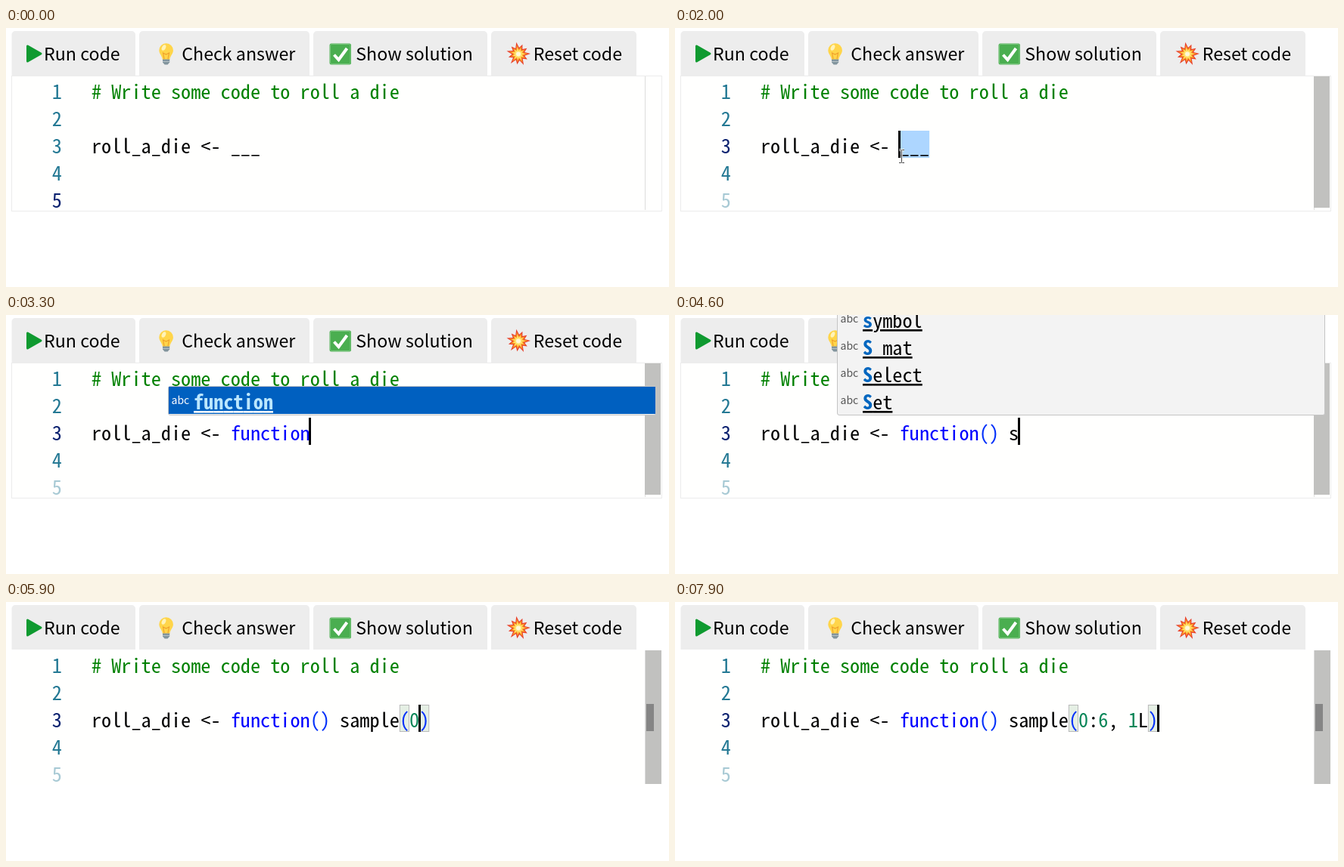
Write an HTML page that moves like this. It is 876 px wide and 343 px high and loops after 8000 ms.

```html
<!DOCTYPE html>
<html lang="en">
<head>
<meta charset="utf-8">
<title>Code editor</title>
<style>
  html, body { margin: 0; width: 100%; height: 100%; overflow: hidden; background: #fff; }
  svg { display: block; width: 876px; height: 343px; }
  text { white-space: pre; }
  .ui { font-family: "Noto Sans CJK JP", "Noto Sans CJK SC", "Noto Sans", sans-serif; font-size: 23.2px; }
  .code, .num { font-family: "Noto Sans Mono CJK JP", "Noto Sans Mono CJK SC", "Noto Sans Mono", monospace; }
  .num { fill: #237893; }
  .num.on { fill: #0b216f; }
  .num.dim { fill: #a7c9d4; }
  .abc { font-family: "Noto Sans CJK JP", "Noto Sans", sans-serif; font-size: 14px; fill: #555; }
  .label { text-decoration: underline; text-decoration-thickness: 1.3px; }
  .hit { fill: #0066bf; font-weight: bold; }
  .sel .label, .sel .abc { fill: #fff; }
  .sel .hit { fill: #bbe7ff; }
</style>
</head>
<body>
<svg id="stage" viewBox="0 0 876 343" xmlns="http://www.w3.org/2000/svg">
  <g id="editor">
    <rect x="7" y="64" width="860" height="179" fill="#fffffe"/>
    <rect id="frame" x="7.5" y="63.5" width="859" height="179" fill="none" stroke="#ececec"/>
    <path d="M844.5 64V241" stroke="#dcdcdc"/>
    <g id="scroll"></g>
    <g id="code"></g>
  </g>
  <g id="toolbar"></g>
  <g id="popup"></g>
  <g id="mouse"></g>
</svg>
<script>
const $ = id => document.getElementById(id);
const LOOP = 8000, CW = 13.125, LH = 36, X0 = 113, TOP = 64, BASE = 30;
const esc = s => s.replace(/&/g, '&amp;').replace(/</g, '&lt;');
const rect = (x, y, w, h, attrs) => `<rect x="${x}" y="${y}" width="${w}" height="${h}" ${attrs}/>`;
const colX = col => X0 + col * CW;
const lineY = line => TOP + (line - 1) * LH;

// Pick the size at which one monospaced cell is CW wide.
function monoSize() {
  const ctx = document.createElement('canvas').getContext('2d');
  ctx.font = '100px "Noto Sans Mono CJK JP", "Noto Sans Mono CJK SC", "Noto Sans Mono", monospace';
  return CW * 100 / ctx.measureText('0').width;
}
$('stage').style.setProperty('--mono', monoSize() + 'px');
document.head.appendChild(document.createElement('style')).textContent =
  '.code, .num { font-size: var(--mono); }';

/* Toolbar */
function star(cx, cy, outer, inner, n, fill) {
  let pts = '';
  for (let i = 0; i < 2 * n; i++) {
    const wobble = i % 4 ? 1 : 0.86;
    const r = (i % 2 ? inner : outer) * wobble, a = Math.PI * i / n - 0.6;
    pts += `${(cx + r * Math.cos(a)).toFixed(1)},${(cy + r * Math.sin(a)).toFixed(1)} `;
  }
  return `<polygon points="${pts}" fill="${fill}"/>`;
}
const play = '<path d="M28.5 24V44L46 34Z" fill="#0f9a30" stroke="#0f9a30" stroke-width="3" stroke-linejoin="round"/>';
const bulb = '<path d="M202.3 29.5a9.3 9.3 0 0 1 18.6 0c0 5-4 7-4.6 12.5h-9.4c-.6-5.500-4.600-7.500-4.600-12.500Z" fill="#ffd54a"/>' +
  '<ellipse cx="208.500" cy="26" rx="2.500" ry="4" fill="#fff3b8" transform="rotate(25 208.500 26)"/>' +
  '<path d="M209 41l-1.500-8 4 2 4-2-1.500 8" fill="none" stroke="#f0a12b" stroke-width="1.200"/>' +
  '<path d="M207 41.500h9.200v4l-2.600 3h-4l-2.600-3Z" fill="#82949d"/><path d="M207 44.500h9" stroke="#b6c3c9"/>';
const check = rect(427.5, 20.5, 28.5, 28, 'rx="2.5" fill="#4aae50"') +
  rect(428.5, 21.5, 26.5, 26, 'rx="2" fill="none" stroke="#78c67c" stroke-width="1"') +
  '<path d="M433.500 35.500l6 6.500 11-15" fill="none" stroke="#fff" stroke-width="4"/>';
const burst = star(677, 34.5, 16, 8.5, 11, '#e8402c') + star(677, 34.5, 12.5, 6.5, 11, '#fb9a25') +
  star(677, 34.5, 9, 4.5, 11, '#ffe36b') + '<circle cx="677" cy="34.500" r="3" fill="#fff8d8"/>';
const button = (x, right, tx, label, icon) =>
  `<path d="M${x} 63V9a5 5 0 0 1 5-5H${right - 5}a5 5 0 0 1 5 5V63Z" fill="#ededed"/>${icon}` +
  `<text class="ui" x="${tx}" y="43">${label}</text>`;
$('toolbar').innerHTML =
  button(7.5, 171, 50, 'Run code', play) +
  button(176, 401, 232.3, 'Check answer', bulb) +
  button(406, 636, 462.3, 'Show solution', check) +
  button(641, 833, 696.8, 'Reset code', burst);

/* Timeline: [ms, text after the assignment, caret offset from the end, suggestions, selected row] */
const F = ['from', 'for', 'Find', 'Fluorine'], S = ['symbol', 'S_mat', 'Select', 'Set'];
const FN = ['function'];
const TYPING = [
  [0, '___', 0],
  [2000, '___', 3],
  [2300, 'f', 0],
  [2400, 'f', 0, F, -1],
  [2600, 'fun', 0, ['function', 'Fluorine'], 0],
  [2700, 'func', 0, FN, 0],
  [3000, 'funct', 0, FN, 0],
  [3200, 'functio', 0, FN, 0],
  [3300, 'function', 0, FN, 0],
  [3600, 'function()', 1],
  [3700, 'function()', 0],
  [4100, 'function() ', 0],
  [4500, 'function() s', 0],
  [4600, 'function() s', 0, S, -1],
  [4700, 'function() sa', 0, ['S_mat'], 0],
  [4800, 'function() sam', 0],
  [4900, 'function() samp', 0],
  [5000, 'function() sampl', 0],
  [5500, 'function() sample', 0],
  [5700, 'function() sample()', 1],
  [5900, 'function() sample(0)', 1],
  [6200, 'function() sample(0:)', 1],
  [6400, 'function() sample(0:6)', 1],
  [6800, 'function() sample(0:6,)', 1],
  [7000, 'function() sample(0:6, )', 1],
  [7300, 'function() sample(0:6, 1)', 1],
  [7500, 'function() sample(0:6, 1L)', 1],
  [7900, 'function() sample(0:6, 1L)', 0]
];
const PREFIX = 'roll_a_die <- ';
const at = (list, t) => list.filter(s => s[0] <= t).pop();

function paint(text) {
  return esc(text)
    .replace(/\bfunction\b|[()]|\d/g, m => {
      const color = m === 'function' ? '#0000ff' : /\d/.test(m) ? '#098658' : '#0431fa';
      return `<tspan fill="${color}">${m}</tspan>`;
    });
}
const codeLine = (line, body, fill) =>
  `<text class="code" x="${X0}" y="${lineY(line) + BASE}" fill="${fill}">${body}</text>`;

// Columns of the bracket pair next to the caret.
function brackets(text, back) {
  if (!text.endsWith(')') || text === 'function') return [];
  const inner = text.slice(text.lastIndexOf('('));
  return back <= 1 ? [text.length - inner.length, text.length - 1] : [];
}

function drawCode(t, [, text, back]) {
  const active = t < 1200 ? 5 : t < 1800 ? 4 : 3;
  let out = '';
  for (let n = 1; n <= 5; n++) {
    const cls = n === active ? 'on' : n === 5 ? 'dim' : '';
    out += `<text class="num ${cls}" x="60.800" y="${lineY(n) + BASE}">${n}</text>`;
  }
  const full = PREFIX + text, pair = brackets(text, back), y = lineY(3);
  if (t >= 2000 && t < 2300) out += rect(colX(14), y, 3 * CW, LH, 'fill="#add6ff"');
  for (const c of pair) {
    out += rect(colX(PREFIX.length + c) + 0.5, y + 0.5, CW - 1, LH - 1,
      'fill="#006400" fill-opacity=".1" stroke="#b9b9b9"');
  }
  out += codeLine(1, '# Write some code to roll a die', '#008000') + codeLine(3, paint(full), '#000');
  if (active < 5) {
    const col = active === 4 ? 0 : full.length - back;
    out += rect(Math.floor(colX(col) - (col ? 0.9 : 0)), lineY(active), 3, LH, 'fill="#000"');
  }
  $('code').innerHTML = out;

  const left = t >= 5200;
  $('frame').setAttribute('visibility', left ? 'hidden' : 'visible');
  $('scroll').innerHTML = t < 700 ? '' :
    (left ? rect(845, 64, 21, 177, 'fill="#c1c1bf"') : rect(844, 64, 21, 174, 'fill="#c1c1bf"')) +
    (pair.length ? rect(846, 135, 10, 36, 'fill="#858585"') : '');
}

/* Suggestion list */
function mark(word, typed) {
  let i = 0;
  return [...word].map(ch => {
    const hit = i < typed.length && ch.toLowerCase() === typed[i];
    if (hit) i++;
    return hit ? `<tspan class="hit">${ch}</tspan>` : ch;
  }).join('');
}
function drawPopup([, text, , words, chosen]) {
  if (!words) return void ($('popup').innerHTML = '');
  const typed = text.split(' ').pop(), bottom = 131;
  const top = words.length > 3 ? -20 : bottom - words.length * LH;
  let out = rect(214.5, top - 0.5, 644, bottom - top + 2, 'rx="2.5" fill="#f3f3f3" stroke="#c4c4c4"');
  words.forEach((word, i) => {
    const y = bottom - (words.length - i) * LH, on = i === chosen;
    out += `<g class="${on ? 'sel' : ''}">` +
      (on ? rect(215, y, 643, LH, 'fill="#0060c0"') : '') +
      `<text class="abc" x="218.500" y="${y + 23}">abc</text>` +
      `<text class="code label" x="248" y="${y + BASE}">${mark(word, typed)}</text></g>`;
  });
  $('popup').innerHTML = out;
}

/* Pointer, sampled every 100 ms */
function drawMouse(t) {
  if (t < 300 || t >= 2300) return void ($('mouse').innerHTML = '');
  let x = 342.5, y = 172;
  if (t < 1000) {
    const p = (Math.floor(t / 100) - 3) / 7, e = 1 - (1 - p) ** 2;
    x = 450 - 107.5 * e;
    y = 325 - 153 * e;
  } else if (t >= 2000) {
    x = 299.5; y = 170;
  } else if (t >= 1600) {
    x = 369.5; y = 170;
  }
  const beam = 'M-3.500-8.500H-1Q0-8.500 0-7.500Q0-8.500 1-8.500H3.500M0-7.500V7.500M-3.500 8.500H-1Q0 8.500 0 7.500Q0 8.500 1 8.500H3.500';
  const arrow = 'M0 0V16L4 12.500 6.500 18 9 17 6.500 11.500H11.500Z';
  $('mouse').innerHTML = `<g transform="translate(${x.toFixed(1)} ${y.toFixed(1)})">` + (y < 243
    ? `<path d="${beam}" fill="none" stroke="#fff" stroke-width="2.500"/><path d="${beam}" fill="none" stroke="#444"/>`
    : `<path d="${arrow}" fill="#000" stroke="#fff"/>`) + '</g>';
}

let last = -1;
function render(now) {
  const t = Math.floor((now % LOOP) / 100) * 100;
  if (t !== last) {
    last = t;
    const state = at(TYPING, t);
    drawCode(t, state);
    drawPopup(state);
    drawMouse(t);
  }
}
const start = performance.now();
function tick() {
  render(performance.now() - start);
  requestAnimationFrame(tick);
}
tick();
</script>
</body>
</html>
```
